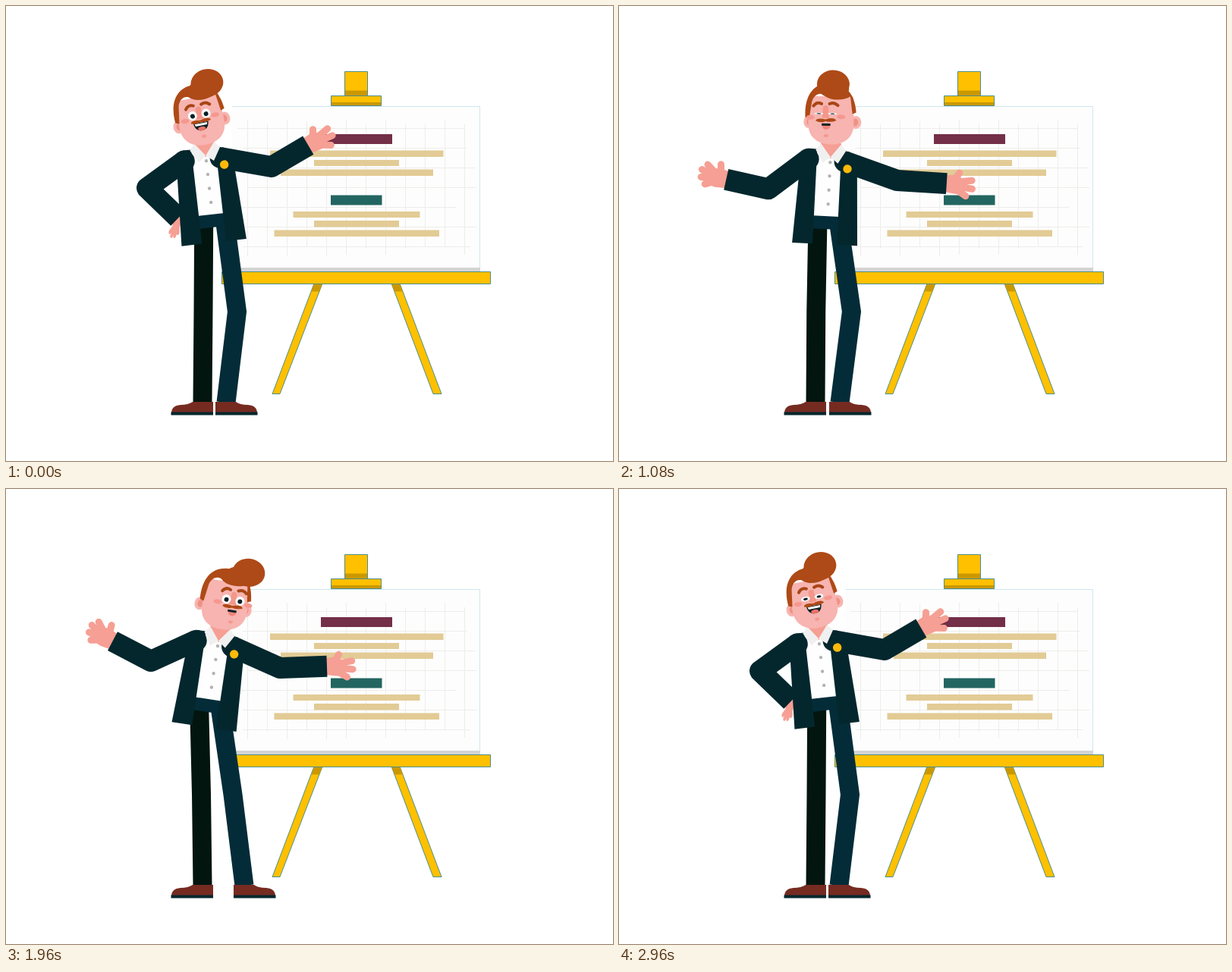
These frames come from a looping animation (800x600 px, 3000 ms). An HTML page:

```html
<!DOCTYPE html>
<html lang="en">
<head>
<meta charset="utf-8">
<title>Presenter at an easel</title>
<style>
  html, body { margin: 0; width: 100%; height: 100%; overflow: hidden; background: #fff; }
  svg { display: block; width: 800px; height: 600px; }
  .wood { fill: #ffc000; stroke: #4c8f8c; stroke-width: 1; }
  .shade { fill: #cb9800; }
  .grid { stroke: #ededea; fill: none; }
  .tan { fill: #e2cb95; }
  .jacket { fill: #03272d; }
  .sleeve { fill: none; stroke: #03272d; stroke-width: 28; stroke-linejoin: round; }
  .leg { fill: none; stroke-width: 25; stroke-linejoin: miter; }
  .skin { fill: #f7b4b0; }
  .pink { fill: #f69f94; }
  .hair { fill: #ae4a17; }
  .finger { stroke: #f69f94; stroke-width: 9; stroke-linecap: round; fill: none; }
  .brow { stroke: #a84616; stroke-width: 4; stroke-linecap: round; fill: none; }
</style>
</head>
<body>
<svg viewBox="0 0 800 600">
  <g id="easel">
    <path fill="#fdfdfd" d="M298 132H625V350H298z"/>
    <path fill="none" stroke="#cfe7f0" d="M298 132.5H624.5V350"/>
    <path class="grid" d="M318.500 150V330M344.500 156V320M370.500 150V330M396.500 152V317M422.500 156V330M448.500 150V328M474.500 156V320M500.500 150V328M526.500 156V320M552.500 156V318M578.500 150V317M604.500 156V328"/>
    <path class="grid" d="M305 161.500H605M312 187.500H608M312 213.500H618M318 239.500H620M310 265.500H593M312 291.500H620M312 317.500H612"/>
    <path fill="#732f47" d="M415 169H509V182H415z"/>
    <path fill="#236560" d="M428 249.500H495.500V262.500H428z"/>
    <path class="tan" d="M348 190.500H576.500V199H348zM406 203H518V211H406zM362 215.500H563V224H362zM378.500 271H545.500V279H378.500zM406 283H518V291.500H406zM353.500 295.500H571V304H353.500z"/>
    <path fill="#d4d4d4" d="M298 345H625V350H298z"/>
    <path class="wood" d="M406 366H417L361 511.500H351zM508 366H519L574 511.500H563z"/>
    <path class="shade" d="M406 366H417L413 376.500H402.500zM508 366H519L523 376.500H512z"/>
    <path class="wood" d="M284.500 350.500H638.500V366.500H284.500zM446.500 86.500H476.500V118.500H446.500zM428.500 118.500H494.500V131.500H428.500z"/>
    <path class="shade" d="M447 111.500H476V118H447zM429 127H494V131H429z"/>
  </g>

  <g id="handL">
    <path class="pink" d="M-3 -11L12 -13Q26 -8 24 5Q20 13 12 13L-3 11z"/>
    <path class="finger" d="M8 -5L11 -18M15 -5L28 -14M15 0L34 -6M15 3L33 4M13 5L26 12"/>
  </g>
  <g id="handR">
    <path class="pink" d="M-3 -11L12 -12Q26 -8 24 6Q20 14 12 13L-3 11z"/>
    <path class="finger" d="M9 -4L16 -15M15 -3L33 -6M15 3L34 5M13 7L26 15"/>
  </g>
  <path id="legL" class="leg" stroke="#02150f"/>
  <path id="legR" class="leg" stroke="#042c38"/>
  <g>
    <path fill="#762b21" d="M246 522H273V537H218Q218 527 230 526Q240 526 246 522z"/>
    <path class="jacket" d="M217.500 535.500H273V539.500H217.500z"/>
  </g>
  <g id="shoeR">
    <path fill="#762b21" d="M0 522H27Q32 526 43 526Q55 527 55 537H0z"/>
    <path class="jacket" d="M0 535.500H55.500V539.500H0z"/>
  </g>

  <g id="torso">
    <path fill="#042c38" d="M-26 -2H28V17H-26z"/>
    <path fill="#fefefe" d="M-17 -90H18V0H-17z"/>
    <g fill="#b3b3b3">
      <circle cx="2" cy="-71" r="2.200"/><circle cx="2" cy="-53" r="2.200"/>
      <circle cx="2" cy="-34.500" r="2.200"/><circle cx="2" cy="-16" r="2.200"/>
    </g>
    <path class="jacket" d="M-43 37H-16V-88H-27L-38 -60zM16 37H43L38 -60L21 -88H16z"/>
    <circle class="jacket" cx="-27" cy="-74" r="14"/>
    <circle class="jacket" cx="21" cy="-73" r="14"/>
  </g>
  <path id="armL" class="sleeve"/>
  <path id="armR" class="sleeve"/>
  <path id="neck" fill="none" stroke="#f69f94" stroke-width="25"/>
  <g id="collar">
    <path class="pink" d="M-11 -97H15L17 -90L2 -76L-13 -90z"/>
    <path fill="#f0f0f0" d="M-18 -87L-11 -95L2 -78L-8 -70zM22 -87L15 -95L2 -78L12 -70z"/>
    <circle fill="#ffb90a" cx="25" cy="-63.500" r="5.700"/>
  </g>

  <g id="head">
    <g id="ears">
      <ellipse class="skin" cx="-31" cy="4" rx="7" ry="8.500"/><ellipse class="skin" cx="31" cy="4" rx="7" ry="8.500"/>
      <ellipse fill="#ef9284" cx="-30" cy="4" rx="4" ry="5"/><ellipse fill="#ef9284" cx="30" cy="4" rx="4" ry="5"/>
    </g>
    <path class="skin" d="M-29 -30H29L30 6C30 24 18 33.500 0 33.500C-18 33.500 -30 24 -30 6z"/>
    <path class="hair" d="M-34 -2C-36 -30 -24 -47 -3 -47C16 -48 31 -36 33 -9L28 -7L25 -30C15 -24 -3 -24 -10 -32C-18 -36 -25 -29 -26 -20L-29 0z"/>
    <g id="bun">
      <ellipse class="hair" cx="0" cy="-46" rx="21.500" ry="18.500"/>
    </g>
    <ellipse id="fringe" class="hair" cy="-40" rx="20" ry="12"/>
    <g id="face">
      <ellipse fill="#f5988f" cx="-20" cy="5" rx="5.500" ry="3"/>
      <ellipse fill="#f5988f" cx="20.500" cy="4" rx="5.500" ry="3"/>
      <path fill="#f3978a" d="M-3.500 -9Q0 -13 3.500 -9L4.500 6H-4.500z"/>
      <path class="brow" d="M-16 -10Q-12 -16 -5.500 -13M5 -13Q11 -16 16 -11"/>
      <g id="eyes">
        <circle fill="#fff" cx="-9" r="6"/><circle fill="#fff" cx="9" r="6"/>
        <circle fill="#021f26" cx="-9" cy=".5" r="3"/><circle fill="#021f26" cx="9" cy=".5" r="3"/>
      </g>
      <g id="talk">
        <ellipse fill="#f0857a" cx="1" cy="17" rx="5" ry="4"/>
        <path fill="#0b2025" d="M-5 13H6.500V16H-5z"/>
      </g>
      <g id="smile">
        <path fill="#0b2025" d="M-10 10.500H10Q9 21 0 21T-10 10.500z"/>
        <path fill="#fff" d="M-8.500 11.500H8.500L7.500 14.500H-7.500z"/>
        <ellipse fill="#ec7168" cx="0" cy="18.500" rx="5" ry="2.500"/>
      </g>
      <path class="hair" d="M-13 9.500Q-12 5 0 7.500Q12 4 14 9Q7 12 0 10Q-7 13 -13 9.500z"/>
      <ellipse fill="#f5988f" cx="1" cy="29" rx="3" ry="2"/>
    </g>
  </g>
</svg>
<script>
  const LOOP = 3000;
  const FOREARM = 57;
  const el = Object.fromEntries([...document.querySelectorAll('[id]')].map(n => [n.id, n]));

  // torso x, y, tilt | left elbow x, y, forearm angle | right elbow x, y, forearm angle, length
  // knees left, right | right foot x | head x, y, tilt | bun shift, face shift | hand on hip
  const poses = {
    hip:    [270, 275, -6.5,   186, 240, 44,  350, 212, -30.4, 56,   260, 304.5, 276,   257, 150, -11, 17, -1,   1],
    dip:    [274, 283.5, 6.5,  212, 251, 166.5, 368, 248, 12.4, 67.5,  261, 314, 276,   294, 160, 11, 22.5, 5,    0],
    open:   [273, 277, 3,      197, 241, 192.4, 367, 230, 4, 65.5,     260, 306.5, 276.7, 280, 149, 1, 2, -7.5,   0],
    away:   [263.5, 283, -10,  182, 261, 211.7, 329, 232, -33, 53.5,   237.5, 301, 304, 236, 152, -17, 22, 10,    0],
    back:   [266.5, 277, 8.5,  191, 227, 207.6, 361, 236, -2, 62,      257.5, 299, 300, 289, 152, 9, 24, 9.5,     0],
    centre: [272, 275, 0,      216, 251, 201, 349, 226, -46.6, 51,     260, 305, 276,   271, 147, -3.5, 6, -5,    0]
  };
  const keys = [
    [0, 'hip'], [500, 'hip'], [720, 'dip'], [940, 'open'], [1060, 'open'], [1400, 'away'],
    [1740, 'away'], [1960, 'back'], [2240, 'centre'], [2560, 'centre'], [2820, 'hip'], [LOOP, 'hip']
  ];

  const slope = (k, c) => {
    if (k < 0 || k >= keys.length - 1) return 0;
    const [t0, a] = keys[k], [t1, b] = keys[k + 1];
    return (poses[b][c] - poses[a][c]) / (t1 - t0);
  };
  // Zero at turning points and holds, so nothing overshoots
  const tangent = (k, c) => {
    const a = slope(k - 1, c), b = slope(k, c);
    return a * b > 0 ? 2 * a * b / (a + b) : 0;
  };

  function poseAt(t) {
    let k = 0;
    while (k < keys.length - 2 && keys[k + 1][0] <= t) k++;
    const [t0, a] = keys[k], [t1, b] = keys[k + 1];
    const d = t1 - t0, u = (t - t0) / d, v = 1 - u;
    return poses[a].map((from, c) =>
      from * v * v * (1 + 2 * u) + poses[b][c] * u * u * (3 - 2 * u) +
      d * u * v * (v * tangent(k, c) - u * tangent(k + 1, c)));
  }

  const rad = deg => deg * Math.PI / 180;
  const polar = (x, y, deg, r) => [x + r * Math.cos(rad(deg)), y + r * Math.sin(rad(deg))];
  const placer = (x, y, deg) => (px, py) => {
    const c = Math.cos(rad(deg)), s = Math.sin(rad(deg));
    return [x + px * c - py * s, y + px * s + py * c];
  };
  const set = (node, value) => node.setAttribute('transform', value);
  const line = (node, ...pts) => node.setAttribute('d', 'M' + pts.map(p => p.map(n => n.toFixed(2)).join(' ')).join('L'));
  const blink = t => Math.max(0.2, Math.min(1, Math.abs(t - 1080) / 90, Math.abs(t - 2920) / 80));

  function draw(t) {
    const [tx, ty, tilt, lx, ly, la, rx, ry, ra, rl, kneeL, kneeR, foot,
      hx, hy, nod, bun, face, fold] = poseAt(t);
    const body = placer(tx, ty, tilt), skull = placer(hx, hy, nod);
    const cuffL = polar(lx, ly, la, FOREARM), cuffR = polar(rx, ry, ra, rl);

    line(el.armL, body(-27, -74), [lx, ly], cuffL);
    line(el.armR, body(21, -73), [rx, ry], cuffR);
    line(el.legL, body(-10.5, 10), [kneeL, 403], [259, 523]);
    line(el.legR, body(17.5, 10), [kneeR, 403], [foot + 14, 523]);
    line(el.neck, body(2, -88), skull(0, 18));

    set(el.handL, `translate(${cuffL}) rotate(${la + 61 * fold}) scale(${1 - 0.28 * fold} ${0.6 * fold - 1})`);
    set(el.handR, `translate(${cuffR}) rotate(${ra})`);
    set(el.shoeR, `translate(${foot})`);
    for (const part of [el.torso, el.collar]) set(part, `translate(${tx} ${ty}) rotate(${tilt})`);
    set(el.head, `translate(${hx} ${hy}) rotate(${nod})`);
    set(el.ears, `translate(${-face * 0.25})`);
    set(el.bun, `translate(${bun})`);
    set(el.fringe, `translate(${bun * 0.5 + 2})`);
    set(el.face, `translate(${face} -7)`);
    set(el.eyes, `scale(1 ${blink(t)})`);
    el.smile.style.display = fold > 0.5 ? '' : 'none';
    el.talk.style.display = fold > 0.5 ? 'none' : '';
  }

  const start = performance.now();
  function tick() {
    draw((performance.now() - start) % LOOP);
    requestAnimationFrame(tick);
  }
  tick();
</script>
</body>
</html>
```
